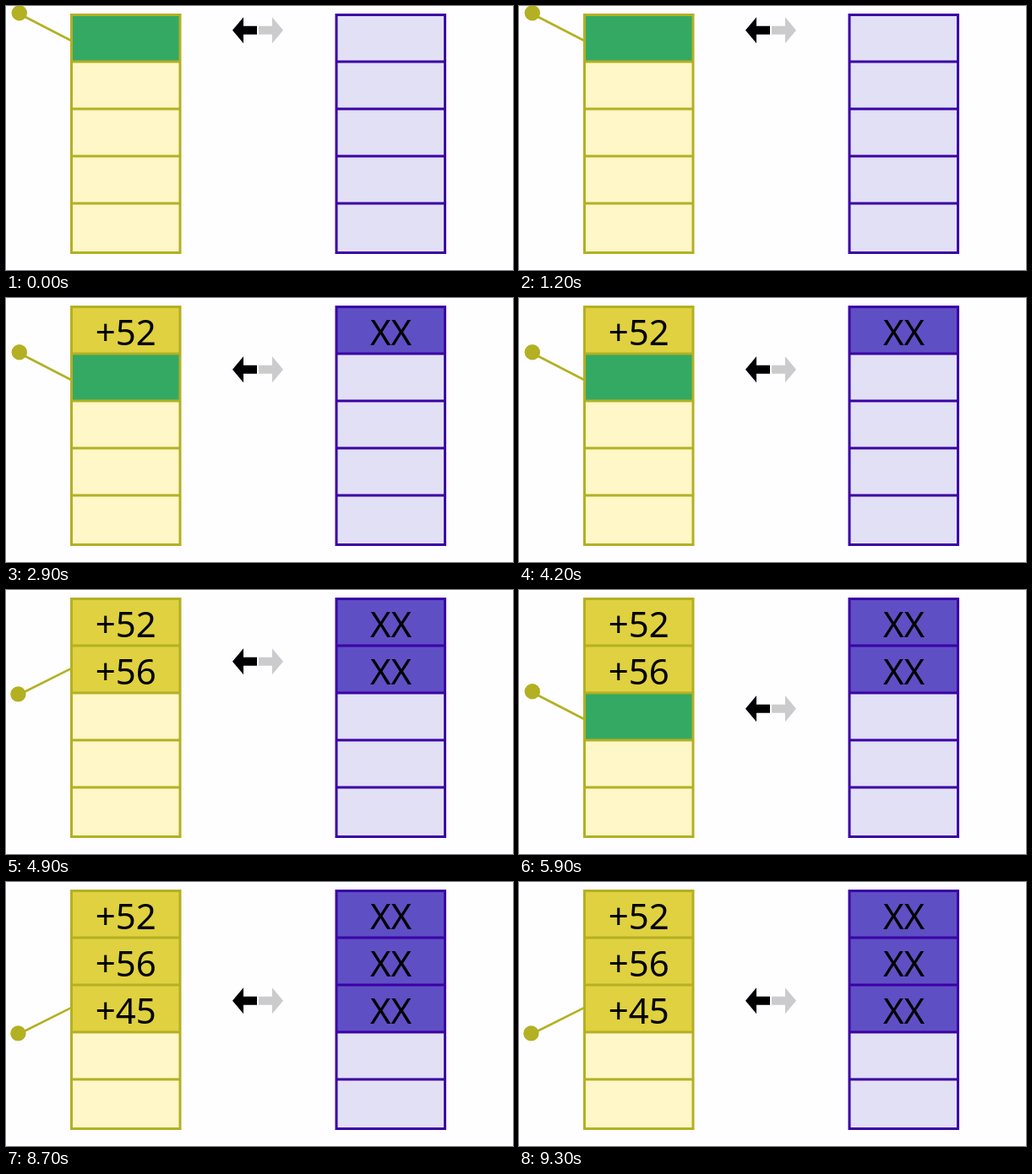
These frames come from a looping animation (600x313 px, 9500 ms). An HTML page:

```html
<!DOCTYPE html>
<html lang="en">
<head>
<meta charset="utf-8">
<title>Two column table</title>
<style>
  html, body { margin: 0; width: 100%; height: 100%; overflow: hidden; background: #fefdff; }
  svg { display: block; width: 600px; height: 313px; }
  text { font: 42px "Noto Sans", "Open Sans", sans-serif; text-anchor: middle; }
  .lever { fill: #b3b023; stroke: #b3b023; stroke-width: 2.6; }
  .lever circle { stroke: none; }
  .grid { fill: none; stroke-width: 3; }

  .marker, .up, .down, .row { animation: 9.5s step-end infinite; }
  .marker { animation-name: advance; }
  .up { animation-name: up; }
  .down { animation-name: down; }
  .row1 { animation-name: row1; }
  .row2 { animation-name: row2; }
  .row3 { animation-name: row3; }

  @keyframes advance {
    0% { transform: translateY(0); }
    30.526% { transform: translateY(56px); }
    62.105%, 100% { transform: translateY(112px); }
  }
  @keyframes up {
    0%, 30.526%, 62.105% { visibility: visible; }
    20%, 51.579%, 91.579%, 100% { visibility: hidden; }
  }
  @keyframes down {
    0%, 30.526%, 62.105% { visibility: hidden; }
    20%, 51.579%, 91.579%, 100% { visibility: visible; }
  }
  @keyframes row1 { 0% { visibility: hidden; } 20%, 100% { visibility: visible; } }
  @keyframes row2 { 0% { visibility: hidden; } 51.579%, 100% { visibility: visible; } }
  @keyframes row3 { 0% { visibility: hidden; } 91.579%, 100% { visibility: visible; } }
</style>
</head>
<body>
<svg viewBox="0 0 600 313">
  <defs>
    <path id="grid" d="M1.5 10.5H130v282H1.5zM1.5 66H130M1.5 122H130M1.5 178H130M1.5 234H130"/>
    <path id="arrow" d="M-30 0L-17-15.5V-5H-1V5H-17V15.5z"/>
    <g id="cells">
      <rect x="77" y="10" width="129" height="56" fill="#e0d140"/>
      <rect x="391" y="10" width="129" height="56" fill="#5f4fc4"/>
      <text x="455.5" y="56">XX</text>
    </g>
  </defs>

  <rect x="77" y="10" width="129" height="282" fill="#fff7c7"/>
  <rect x="391" y="10" width="129" height="282" fill="#e1e0f5"/>

  <g class="marker">
    <rect x="77" y="10" width="129" height="56" fill="#33a964"/>
    <use href="#arrow" x="298" y="28.8"/>
    <use href="#arrow" transform="translate(298 28.8) scale(-1 1)" fill="#cbcbcb"/>
    <g class="lever up"><path d="M16 9.5L77 41"/><circle cx="15.8" cy="8.3" r="9.2"/></g>
    <g class="lever down"><path d="M14.5 68.5L77 37.2"/><circle cx="14.4" cy="67.4" r="9.2"/></g>
  </g>

  <g class="row row1"><use href="#cells"/><text x="141.7" y="56">+52</text></g>
  <g class="row row2"><use href="#cells" y="56"/><text x="141.7" y="112">+56</text></g>
  <g class="row row3"><use href="#cells" y="112"/><text x="141.7" y="168">+45</text></g>

  <use href="#grid" x="76" class="grid" stroke="#b3b023"/>
  <use href="#grid" x="389.5" class="grid" stroke="#3b00a5"/>
</svg>
</body>
</html>
```
